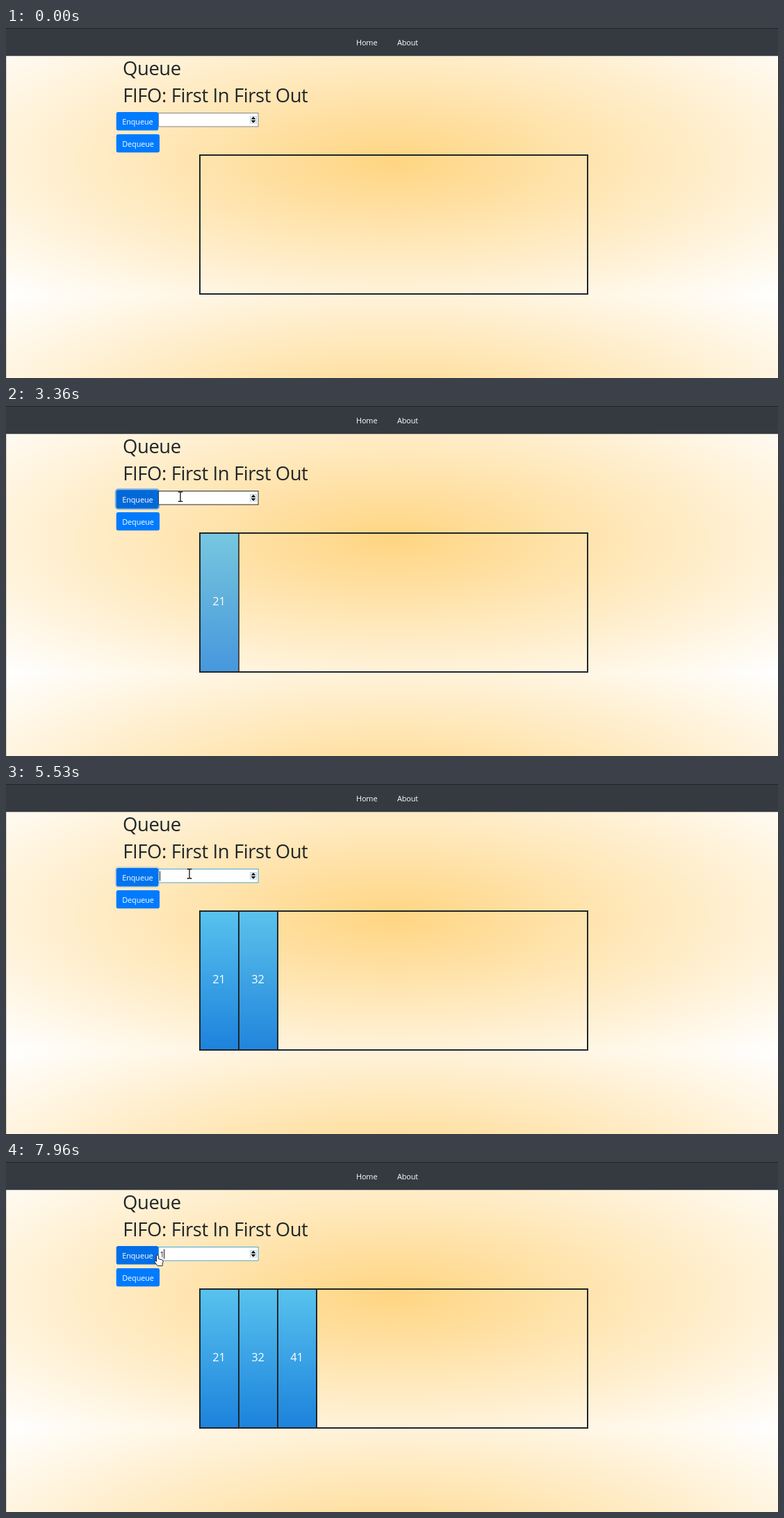
Write an HTML page that moves like this. It is 1111 px wide and 504 px high and loops after 8000 ms.

```html
<!DOCTYPE html>
<html lang="en">
<head>
<meta charset="utf-8">
<title>Queue</title>
<style>
  html, body { margin: 0; width: 100%; height: 100%; overflow: hidden; }
  body { background: radial-gradient(#ffd582, #fff) 0 0 / 1111px 384px repeat; }
  svg { display: block; width: 1111px; height: 504px; }
  text { font: 10.9px "Open Sans", "Noto Sans", sans-serif; letter-spacing: -.12px; fill: #fff; white-space: pre; }
  .head { font-size: 27.4px; letter-spacing: -.38px; fill: #212529; }
  .num { font-size: 16.4px; letter-spacing: -.2px; text-anchor: middle; }
  #value { fill: #111; letter-spacing: -.2px; }
  .line { fill: none; stroke: #212529; stroke-width: 2; }
</style>
</head>
<body>
<svg viewBox="0 0 1111 504">
  <defs>
    <linearGradient id="blue" x2="0" y2="1">
      <stop stop-color="#58c2ee"/><stop offset="1" stop-color="#1c82dc"/>
    </linearGradient>
  </defs>
  <path d="M.5 40V504" stroke="#000" stroke-opacity=".18"/>
  <rect width="1111" height="40.25" fill="#343a40"/>
  <rect width="1111" height="1" fill="#202428"/>
  <text x="504" y="25">Home</text>
  <text x="563" y="25">About</text>
  <text class="head" x="168" y="68">Queue</text>
  <text class="head" x="168.3" y="107">FIFO: First In First Out</text>

  <rect id="ring" x="158" y="120" width="62" height="28" rx="3.5" fill="none" stroke="#007bff" stroke-width="2.4"/>
  <rect id="field" x="219.5" y="122.5" width="143.5" height="19.5" fill="#fff"/>
  <rect x="351.5" y="127.5" width="9" height="9.5" fill="#f4f8fa" stroke="#b9d3dd"/>
  <path d="M352.6 131.4L356 127.7L359.4 131.4ZM352.6 133L356 136.7L359.4 133Z" fill="#000"/>
  <text id="value" x="221.6" y="137"></text>
  <path id="caret" d="M0 125.5V139.5" stroke="#111"/>
  <rect id="enqueue" x="158.7" y="121" width="60.6" height="26.5" rx="2.8"/>
  <text x="167.3" y="139">Enqueue</text>
  <rect x="158.7" y="153" width="62.3" height="26.3" rx="2.8" fill="#007bff"/>
  <text x="167.3" y="171">Dequeue</text>

  <g id="nodes"></g>
  <rect class="line" x="279" y="183" width="558" height="200"/>

  <g id="cursor">
    <circle id="press" cx="1" cy="-2" r="9.6" fill="#f5ea28" fill-opacity=".58"/>
    <path id="arrow" d="M.5 .5V15L4 11.8L6.3 17L8.6 16L6.4 11H11Z" fill="#fff" stroke="#000" stroke-width=".9"/>
    <path id="hand" d="M-1.7 1.2Q0 -1 1.5 1.2V5.7L6 6.8Q8 7.4 8 9.3L7 13V15.6H0L-4.2 10.2Q-5 8 -3.2 8.1L-1.7 9.4Z" fill="#fff" stroke="#111" stroke-width=".9"/>
    <path id="beam" d="M-3.3 -6.5H-1Q0 -6.3 0 -5.5Q0 -6.3 1 -6.5H3.3M0 -5.5V6M-3.3 7H-1Q0 6.8 0 6Q0 6.8 1 7H3.3" fill="none" stroke="#111" stroke-width="1.3"/>
  </g>
</svg>
<script>
const LOOP = 8000, ENTER = 110, KEY_GAP = 80, FLASH = 80, TRANSITION = 150;
const FIELD = { x: 264, y: 129 }, BUTTON = { x: 198, y: 136 };
const $ = id => document.getElementById(id);

// Each round: click the field, type a value, press Enqueue; the node then fades in
const rounds = [
  { value: '21', type: 1960, added: 2850 },
  { value: '32', type: 3900, added: 4725 },
  { value: '41', type: 5690, added: 6810 },
  { value: '1', type: 7650, added: 8265 }
];
rounds.forEach(r => {
  r.focus = r.type - 250;
  r.press = r.added - 300;
});

const linear = p => p;
const easeOut = p => 1 - (1 - p) ** 2;
const ramp = (t, from, to) => Math.min(1, Math.max(0, (t - from) / (to - from)));

// Cursor legs; it rests in between
const legs = [
  { from: ENTER, to: 260, at: { x: 687, y: 334 }, ease: linear },
  { from: 440, to: 890, at: { x: 439, y: 194 }, ease: linear }
];
rounds.forEach((r, i) => {
  const leave = i ? rounds[i - 1].added + 150 : 1050;
  legs.push({ from: leave, to: r.focus, at: FIELD, ease: easeOut });
  legs.push({ from: r.press - 400, to: r.press + 170, at: BUTTON, ease: linear });
});

function cursorAt(t) {
  let x = 1011, y = 490;
  for (const { from, to, at, ease } of legs) {
    const p = ease(ramp(t, from, to));
    x += (at.x - x) * p;
    y += (at.y - y) * p;
  }
  return { x, y };
}

// Level of a button style that starts `lead` before a press and ends when the field is clicked
function level(t, lead) {
  return Math.max(...rounds.map((r, i) => {
    const on = r.press - lead, off = rounds[i + 1]?.focus ?? LOOP;
    return ramp(t, on, on + TRANSITION) * (1 - ramp(t, off, off + TRANSITION));
  }));
}

function typedAt(t) {
  const r = rounds.find(r => t < r.added);
  return r.value.slice(0, Math.max(0, Math.floor((t - r.type) / KEY_GAP) + 1));
}

const show = (id, on) => $(id).setAttribute('visibility', on ? 'visible' : 'hidden');

const fades = rounds.map((r, i) => {
  const x = 280 + i * 56;
  const g = document.createElementNS('http://www.w3.org/2000/svg', 'g');
  g.innerHTML = `<rect x="${x}" y="183" width="54" height="200" fill="url(#blue)"/>
    <path class="line" d="M${x + 55} 183V383"/>
    <text class="num" x="${x + 26.4}" y="287">${r.value}</text>`;
  $('nodes').append(g);
  const fade = g.animate([{ opacity: 0 }, { opacity: 1 }],
    { duration: 1000, delay: r.added, easing: 'ease', fill: 'both' });
  fade.pause();
  return fade;
});

function draw(t) {
  fades.forEach(f => f.currentTime = t);

  const { x, y } = cursorAt(t);
  const overButton = x < 219.5 && y > 121 && y < 148;
  const overField = !overButton && x < 363 && y > 122 && y < 142;
  const focused = rounds.some(r => t >= r.focus && t < r.press);
  const flash = rounds.some(r => [r.focus, r.press].some(c => t >= c && t < c + FLASH));

  $('cursor').setAttribute('transform', `translate(${x} ${y})`);
  $('cursor').style.display = t < ENTER ? 'none' : '';
  show('hand', overButton);
  show('beam', overField);
  show('arrow', !overButton && !overField);
  show('press', flash);

  const text = typedAt(t);
  $('value').textContent = text;
  $('caret').setAttribute('transform', `translate(${221.5 + text.length * 6.1} 0)`);
  show('caret', focused);
  $('field').setAttribute('stroke', focused ? '#4fa6d3' : overField ? '#2b2b2b' : '#858585');

  const tint = level(t, 100);
  $('enqueue').setAttribute('fill', `rgb(0 ${123 - 18 * tint} ${255 - 38 * tint})`);
  $('ring').setAttribute('stroke-opacity', .5 * level(t, 0));
}

const began = performance.now();
function tick() {
  draw((performance.now() - began) % LOOP);
  requestAnimationFrame(tick);
}
tick();
</script>
</body>
</html>
```
